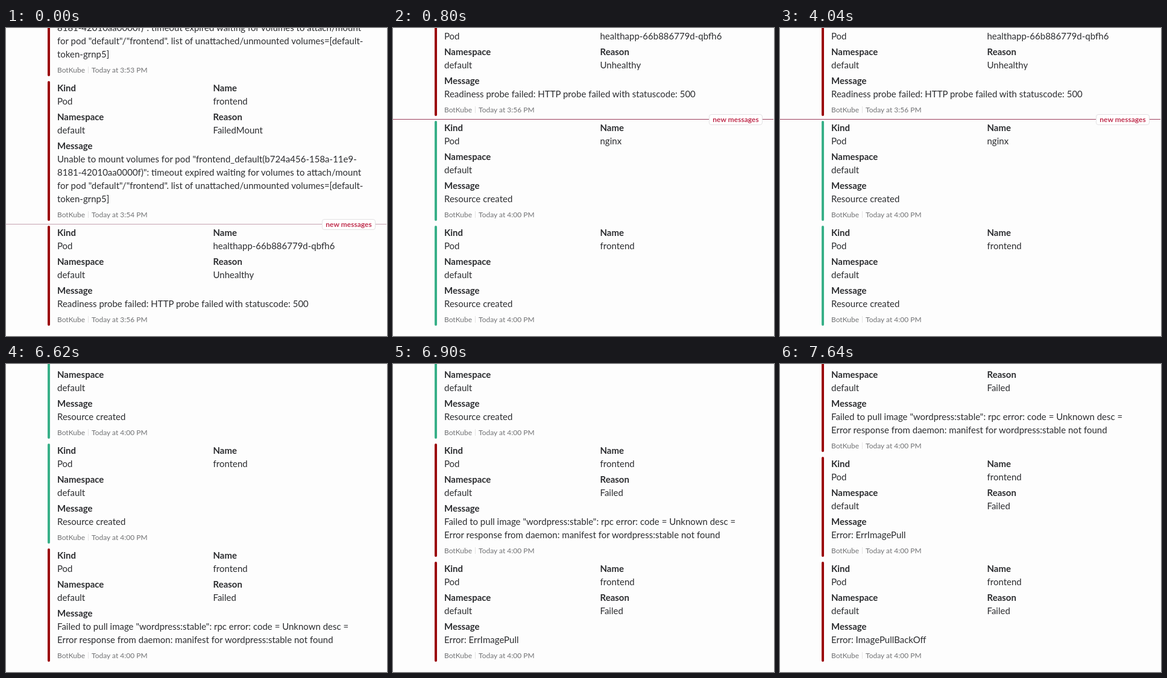
Write an HTML page that moves like this. It is 632 px wide and 511 px high and loops after 8 s.

```html
<!DOCTYPE html>
<html lang="en">
<head>
<meta charset="utf-8">
<title>Pod alerts</title>
<style>
html, body { margin: 0; width: 100%; height: 100%; overflow: hidden; background: #fdfdfd; }
body { position: relative; font: 15px/22px Lato, sans-serif; color: #2c2d30; }
#log { position: absolute; left: 0; top: 0; width: 632px; height: 494px; }
.card { position: absolute; left: 69px; width: 563px; white-space: pre; }
.card::before { content: ""; position: absolute; left: 0; top: 0; width: 4px; height: 100%; border-radius: 4px; background: var(--tone); }
.card div { position: absolute; left: 16px; }
.card .right { left: 274.5px; }
.card .foot { bottom: -1px; font-size: 12px; color: #717274; }
.foot i { display: inline-block; width: 1px; height: 11px; margin: 0 5px; background: #e4e4e4; vertical-align: -1px; }
#rule { position: absolute; left: 0; width: 632px; height: 1px; }
#rule span { position: absolute; left: 524px; top: -8px; box-sizing: border-box; width: 89px; height: 18px; border: 1px solid #e3e1e3; border-radius: 4px; background: #fff; color: #c0304f; font: bold 12px/15px Lato, sans-serif; text-align: center; }
#edge { position: absolute; left: 631px; top: 0; width: 1px; height: 440px; background: #f8f8f8; }
</style>
</head>
<body>
<div id="log"></div>
<div id="rule"><span>new messages</span></div>
<div id="edge"></div>
<script>
const RED = '#9b0206', GREEN = '#38b088', GAP = 8, BOTTOM = 494;
const mount = `Unable to mount volumes for pod "frontend_default(b724a456-158a-11e9-
8181-42010aa0000f)": timeout expired waiting for volumes to attach/mount
for pod "default"/"frontend". list of unattached/unmounted volumes=[default-
token-grnp5]`;
const pull = `Failed to pull image "wordpress:stable": rpc error: code = Unknown desc =
Error response from daemon: manifest for wordpress:stable not found`;

// name, reason, message, time
const alerts = [
  ['frontend', 'FailedMount', mount, '3:53'],
  ['frontend', 'FailedMount', mount, '3:54'],
  ['healthapp-66b886779d-qbfh6', 'Unhealthy', 'Readiness probe failed: HTTP probe failed with statuscode: 500', '3:56'],
  ['nginx', '', 'Resource created', '4:00'],
  ['frontend', '', 'Resource created', '4:00'],
  ['frontend', 'Failed', pull, '4:00'],
  ['frontend', 'Failed', 'Error: ErrImagePull', '4:00'],
  ['frontend', 'Failed', 'Error: ImagePullBackOff', '4:00']
];

// start time, newest alert, alert below the rule, rule colour
const steps = [
  [0, 2, 2, '#c6a3af'],
  [500, 3, 3, '#9c3f5c'],
  [800, 4, 3, '#9c3f5c'],
  [6200, 5],
  [6900, 6],
  [7100, 7]
];

const log = document.getElementById('log');
const rule = document.getElementById('rule');

function makeCard([name, reason, message, time]) {
  const card = document.createElement('div');
  const height = 144 + 22 * message.split('\n').length;
  const field = (label, value, top, side = '') =>
    `<div class="${side}" style="top:${top}px"><b>${label}</b>\n${value}</div>`;
  card.className = 'card';
  card.style.height = height + 'px';
  card.style.setProperty('--tone', reason ? RED : GREEN);
  card.innerHTML = field('Kind', 'Pod', 0) + field('Name', name, 0, 'right') +
    field('Namespace', 'default', 48) + (reason && field('Reason', reason, 48, 'right')) +
    field('Message', message, 96) +
    `<div class="foot">BotKube<i></i>Today at ${time} PM</div>`;
  log.append(card);
  return { card, height };
}

const cards = alerts.map(makeCard);
let shown;

function show([, newest, below, colour]) {
  let bottom = BOTTOM;
  rule.hidden = below === undefined;
  for (let i = cards.length - 1; i >= 0; i--) {
    const { card, height } = cards[i];
    card.hidden = i > newest;
    if (card.hidden) continue;
    const top = bottom - height;
    card.style.top = top + 'px';
    if (i === below) {
      rule.style.top = top - 3 + 'px';
      rule.style.background = colour;
    }
    bottom = top - GAP;
  }
}

function tick() {
  const t = performance.now() % 8000;
  const step = steps.findLast(s => s[0] <= t);
  if (step !== shown) show(shown = step);
  requestAnimationFrame(tick);
}
tick();
</script>
</body>
</html>
```
